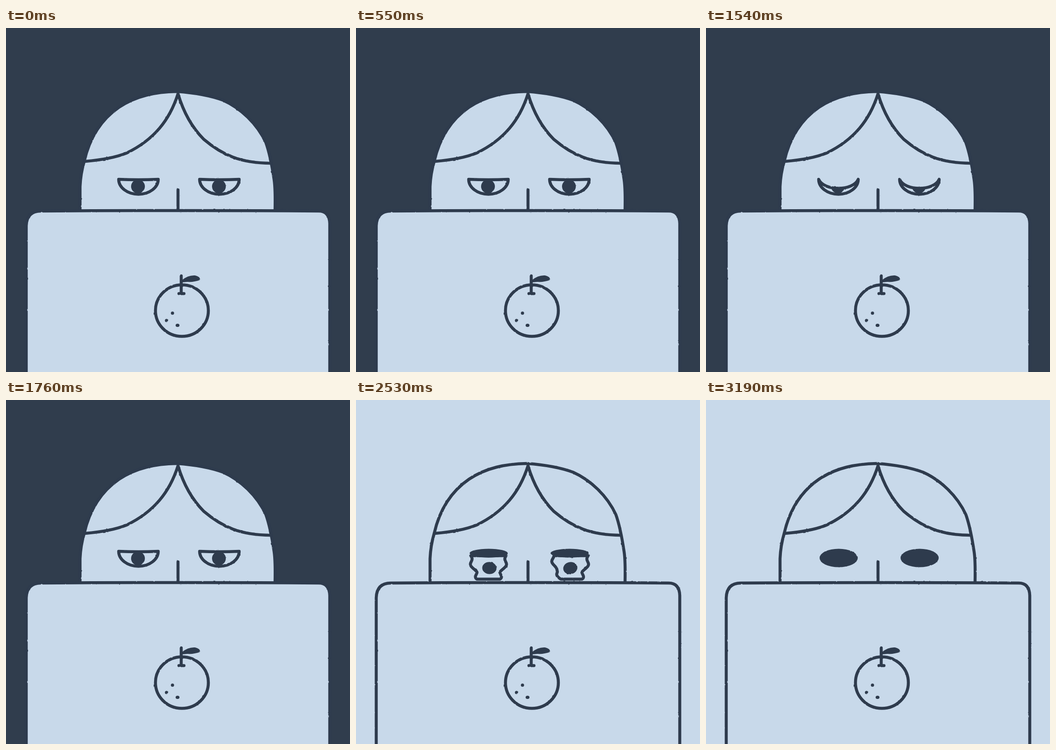
Animation of 748 by 748 pixels, one loop 3740 ms. Source, as an HTML page:

```html
<!DOCTYPE html>
<html lang="en">
<head>
<meta charset="utf-8">
<title>Tired eyes</title>
<style>
  html, body { margin: 0; width: 100%; height: 100%; overflow: hidden; }
  svg { display: block; width: 100vw; height: 100vh; }
  .line { fill: none; stroke: #2e3b4d; stroke-width: 6.5; stroke-linecap: round; stroke-linejoin: round; }
  .skin { fill: #c8d9ea; }
  .ink { fill: #2e3b4d; }
</style>
</head>
<body>
<svg viewBox="0 0 748 748">
  <defs>
    <filter id="rough" filterUnits="userSpaceOnUse" x="-20" y="-20" width="788" height="788" color-interpolation-filters="sRGB">
      <feTurbulence type="fractalNoise" baseFrequency=".12" numOctaves="2" seed="4"/>
      <feDisplacementMap in="SourceGraphic" scale="2" xChannelSelector="R" yChannelSelector="G"/>
    </filter>
  </defs>
  <rect id="wall" width="748" height="748"/>
  <g filter="url(#rough)">
    <path class="line skin" d="M161 397V345C162 322 165 307 170 290C181 242 205 200 246 172C284 147 325 139 372 138C411 141 445 147 472 157C510 174 546 208 565 249C574 274 580 310 583 330Q586 350 585 397"/>
    <path class="line" d="M172 290Q230 285 262 272C322 243 356 200 374 143C388 190 408 220 430 242C470 276 510 294 576 294M374 352V397"/>
    <g id="eyes"></g>
    <path class="line skin" d="M44 770V430Q45 398 76 398Q380 396 680 398Q703 398 704 425V770"/>
    <ellipse class="line" cx="382.5" cy="614.5" rx="57.5" ry="56"/>
    <path class="line" d="M381 539V577M376 577.5H387"/>
    <path class="ink" d="M383 553V548Q396 537 411 538Q422 540 422 548Q408 553 395 552Z"/>
    <g class="ink">
      <circle cx="362" cy="620" r="3.5"/>
      <circle cx="349" cy="636" r="3.5"/>
      <ellipse cx="373" cy="646.5" rx="4.2" ry="3.5"/>
    </g>
  </g>
</svg>
<script>
const STEP = 110, LOOP = 3740, MELT_START = 20, SINK_START = 5, MELT_END = 9;
const BLINK_PEAKS = [2.5, 13];
const HALF = 43, LID_Y = 329;
const wall = document.getElementById('wall');
const eyes = document.getElementById('eyes');

// crests: where the left and right edges bulge most once melted
const sides = [
  { id: 'left', x: 288, lean: 0, tilt: 5, crests: [359, 359] },
  { id: 'right', x: 464, lean: 4, tilt: -22, crests: [352, 359] }
];

const mix = (a, b, p) => a + (b - a) * p;
const arc = (d, rx, ry) => rx * Math.sqrt(Math.max(0, 1 - (d / ry) ** 2));

function eyeball(id, outline, x, y, rx, ry, tilt) {
  return `<clipPath id="${id}"><path d="${outline}"/></clipPath>
    <path class="skin" d="${outline}"/>
    <g clip-path="url(#${id})"><ellipse class="ink" rx="${rx}" ry="${ry}" transform="translate(${x} ${y}) rotate(${tilt})"/></g>
    <path class="line" d="${outline}"/>`;
}

function openEye({ id, x }, lid) {
  const reach = mix(14, HALF, lid), low = LID_Y + mix(1, 32, lid) * 4 / 3;
  const outline = `M${x - HALF} ${LID_Y}C${x - reach} ${low} ${x + reach} ${low} ${x + HALF} ${LID_Y}` +
    `A${HALF} 32.5 0 0 1 ${x - HALF} ${LID_Y}Z`;
  return eyeball(id, outline, x - 1, 344.5, 15, 15, 0);
}

// A bowl with a drip below it turns into a strip with wavy edges
function meltOutline({ x, lean, crests }, melt, fall) {
  const edge = (u, side) => {
    const depth = 42 * u;
    const bowl = Math.max(arc(depth, HALF, 31), depth > 27 ? arc(depth - 27, 15, 15) : 0);
    const y = mix(LID_Y, 345, melt) + mix(42, 57, melt) * u;
    const strip = 36 + 5 * Math.cos((y - crests[side]) / 28 * 2 * Math.PI);
    const half = mix(bowl, strip, melt) * (side ? 1 : -1);
    return [x + lean * melt + half, y + fall];
  };
  const depths = Array.from({ length: 31 }, (_, i) => 1 - (1 - i / 30) ** 2);
  const right = depths.map(u => edge(u, 1));
  const left = depths.map(u => edge(u, 0)).reverse();
  return 'M' + [...right, ...left].join('L') + 'Z';
}

function meltingEye(eye, k) {
  const melt = Math.min(k / SINK_START, 1), sink = Math.max(k - SINK_START, 0);
  const fall = sink * 16, depth = 16 * melt + sink;
  const ball = k < MELT_END ? eyeball(eye.id, meltOutline(eye, melt, fall),
    eye.x + mix(-1, 4, melt), 348 + 29 * melt + fall, 14 + 2.5 * melt, 14 - 1.5 * melt, eye.tilt * melt) : '';
  return ball + `<ellipse class="ink" cx="${eye.x + .5}" cy="${323.5 + depth}" rx="41.5" ry="${depth}"/>`;
}

let shown = -1;
function draw(time) {
  const step = Math.floor(time % LOOP / STEP);
  if (step === shown) return;
  shown = step;
  const k = Math.min(step - MELT_START, MELT_END);
  const lid = Math.max(0, ...BLINK_PEAKS.map(peak => 1 - .4 * Math.abs(step - peak)));
  wall.setAttribute('fill', k < 0 ? '#303d4d' : '#c8d9ea');
  eyes.innerHTML = sides.map(eye => k < 0 ? openEye(eye, lid) : meltingEye(eye, k)).join('');
}

const begin = performance.now();
function tick() {
  draw(performance.now() - begin);
  requestAnimationFrame(tick);
}
tick();
</script>
</body>
</html>
```
